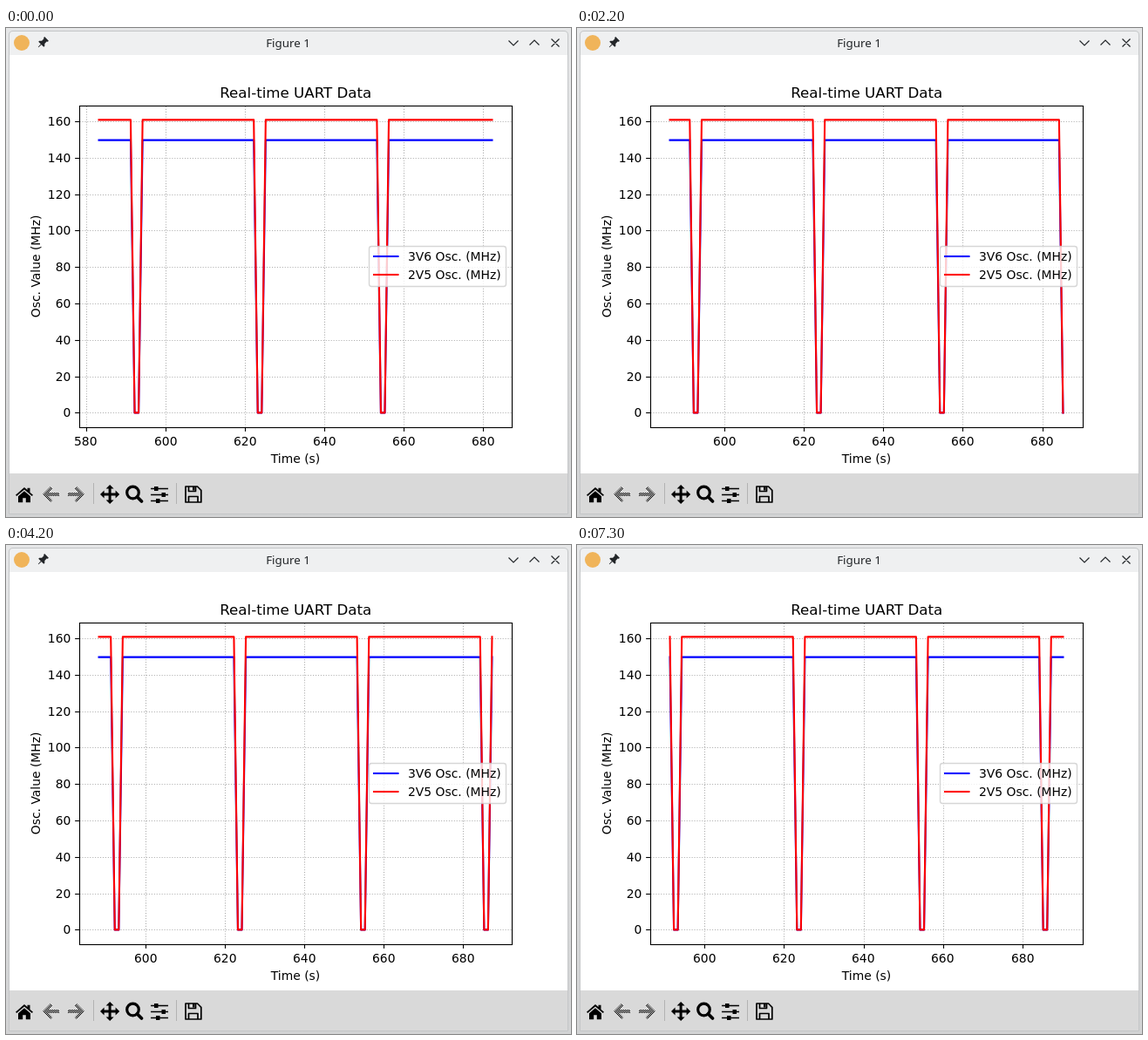
An HTML page that plays this animation: 648x561 px, repeating every 8 s.

```html
<!DOCTYPE html>
<html lang="en">
<head>
<meta charset="utf-8">
<title>Figure 1</title>
<style>
  html, body { margin: 0; width: 100%; height: 100%; overflow: hidden; background: #dfe0e1; }
  svg { display: block; width: 648px; height: 561px; }
  text { font: 13.89px "DejaVu Sans", sans-serif; fill: #000; }
  .title { font-size: 16.67px; }
  .caption { font: 13.33px "Noto Sans", sans-serif; fill: #232629; }
  .mid { text-anchor: middle; }
  .end { text-anchor: end; }
  .grid { stroke: #b0b0b0; stroke-width: 1.11; stroke-dasharray: 1.11 1.83; fill: none; }
  .tick { stroke: #000; stroke-width: 1.11; fill: none; }
  .line { fill: none; stroke-width: 2.08; stroke-linecap: square; stroke-linejoin: round; }
  .blue { stroke: #00f; }
  .red { stroke: #f00; }
  .ctl { fill: none; stroke: #232629; stroke-width: 1.2; }
</style>
</head>
<body>
<svg viewBox="0 0 648 561">
  <defs>
    <pattern id="dots" width="2" height="2" patternUnits="userSpaceOnUse">
      <path d="M0 0h1v1h-1zM1 1h1v1h-1z" shape-rendering="crispEdges"/>
    </pattern>
    <linearGradient id="shade" x2="0" y2="1">
      <stop offset="0" stop-color="#e6e7e8"/>
      <stop offset="1" stop-color="#d2d3d4"/>
    </linearGradient>
  </defs>

  <!-- window -->
  <rect width="648" height="561" fill="url(#shade)"/>
  <path d="M3.5 557.5V8q0-4.500 4.500-4.500H640q4.500 0 4.500 4.500V557.500z" fill="#eff0f1" stroke="#c3c5c7"/>
  <rect x="4" y="31" width="640" height="480" fill="#fff"/>
  <rect x="4" y="511" width="640" height="46" fill="#d9d9d9"/>
  <circle cx="18" cy="17" r="9" fill="#f0b45a"/>
  <g fill="#232629" transform="translate(42 17) rotate(45)">
    <path d="M-3.300-6.500h6.600v1.800h-1v3.700l2 2v1.500h-8.600v-1.500l2-2v-3.700h-1z"/>
    <path d="M-.6 2h1.200l-.3 5h-.6z"/>
  </g>
  <text class="caption mid" x="323.500" y="22">Figure 1</text>
  <path class="ctl" d="M576.500 14.500l5.500 5.500 5.500-5.500M600.500 19.500l5.500-5.500 5.500 5.500M625.500 12.500l9 9M634.500 12.500l-9 9"/>

  <!-- plot -->
  <g id="grid" class="grid"></g>
  <path id="blue" class="line blue"/>
  <path id="red" class="line red"/>
  <g id="yaxis"></g>
  <g id="xaxis"></g>
  <rect x="84.500" y="89.500" width="496" height="369" class="tick"/>
  <text class="title mid" x="332.300" y="80">Real-time UART Data</text>
  <text class="mid" x="332" y="499">Time (s)</text>
  <text class="mid" transform="translate(39 273.400) rotate(-90)">Osc. Value (MHz)</text>
  <rect x="416.500" y="250.500" width="157" height="46" rx="2.800" fill="#fff" fill-opacity=".8" stroke="#ccc" stroke-opacity=".8" stroke-width="1.390"/>
  <path class="line blue" d="M422 262H449.500"/>
  <path class="line red" d="M422 283H449.500"/>
  <text x="461" y="267">3V6 Osc. (MHz)</text>
  <text x="461" y="288">2V5 Osc. (MHz)</text>

  <!-- toolbar -->
  <path d="M100.500 522v24M195.500 522v24" stroke="#b2b2b2"/>
  <path d="M11 535.800L21 527l3.500 3.100v-2.400h3v5L31 535.800l-1.200 1.300L21 529.500l-8.800 7.600z"/>
  <path d="M14 537.200l7-6 7 6v7.100h-5.200v-5h-3.600v5H14z"/>
  <path id="arrow" d="M42 535l9-9 2.300 2.300-4.500 4.600H61v4.200H48.800l4.500 4.600L51 544z" fill="url(#dots)"/>
  <use href="#arrow" transform="matrix(-1 0 0 1 132 0)"/>
  <path id="half" d="M108 535l4.600-4.500v3h13v-3l4.600 4.500-4.600 4.500v-3h-13v3z"/>
  <use href="#half" transform="rotate(90 119.100 535)"/>
  <circle cx="145.500" cy="533" r="6.800" fill="none" stroke="#000" stroke-width="3.200"/>
  <path d="M150.500 538l5 5" stroke="#000" stroke-width="3.800" stroke-linecap="round"/>
  <path d="M166 528.500h20M166 535.500h20M166 542.500h20" stroke="#000" stroke-width="1.700"/>
  <path d="M170 526h4.500v5H170zM178.500 533h4.500v5h-4.500zM172 540h4.500v5H172z"/>
  <g fill="none" stroke="#000" stroke-width="1.700" stroke-linejoin="round">
    <path d="M206 526h13.500l4.300 4.300V544H206zM209.500 544v-6.500h10.500v6.500M209.500 526v5.500h8v-5.500"/>
  </g>
  <path d="M214 526h2.500v4.500H214z"/>
</svg>
<script>
const LOOP = 8000;
const STEPS = [200, 1300, 2200, 3300, 4200, 5300, 6200, 7300];
const SAMPLES = 100, START = 583.25;
const LEFT = 84, RIGHT = 580, TOP = 89.5, BOTTOM = 458.5;
const X0 = 106.545, DX = 450.91 / (SAMPLES - 1);
const Y0 = 441.4, DY = 336 / 160.8;

const el = id => document.getElementById(id);
const snap = v => Math.floor(v + 0.5) + 0.5;
const yAt = v => Y0 - v * DY;
const path = (cls, d) => `<path class="${cls}" d="${d}"/>`;

// The signal falls to zero for two samples in every 31.
const isLow = n => [9, 10].includes(n % 31);

function trace(step, high) {
  let d = "";
  for (let i = 0; i < SAMPLES; i++) {
    const y = yAt(isLow(i + step) ? 0 : high);
    d += `${i ? "L" : "M"}${(X0 + i * DX).toFixed(2)} ${y.toFixed(2)}`;
  }
  return d;
}

let rows = "", yTicks = "";
for (let v = 0; v <= 160; v += 20) {
  const y = snap(yAt(v));
  rows += path("grid", `M84.5 ${y}H580`);
  yTicks += path("tick", `M84 ${y}h-4.86`) +
    `<text class="end" x="74.3" y="${Math.round(yAt(v) + 5)}">${v}</text>`;
}
el("yaxis").innerHTML = yTicks;

function draw(step) {
  let cols = "", ticks = "";
  for (let s = 580; s <= 700; s += 20) {
    const x = X0 + (s - START - step) * DX;
    if (x < LEFT || x > RIGHT) continue;
    cols += path("grid", `M${snap(x)} ${BOTTOM}V${TOP}`);
    ticks += path("tick", `M${snap(x)} 458v4.86`) +
      `<text x="${Math.round(x - 13.25)}" y="479">${s}</text>`;
  }
  el("grid").innerHTML = rows + cols;
  el("xaxis").innerHTML = ticks;
  el("blue").setAttribute("d", trace(step, 149.7));
  el("red").setAttribute("d", trace(step, 160.8));
}

let shown = -1;
function tick() {
  const t = performance.now() % LOOP;
  const step = STEPS.filter(s => s <= t).length;
  if (step !== shown) draw(shown = step);
  requestAnimationFrame(tick);
}
tick();
</script>
</body>
</html>
```
